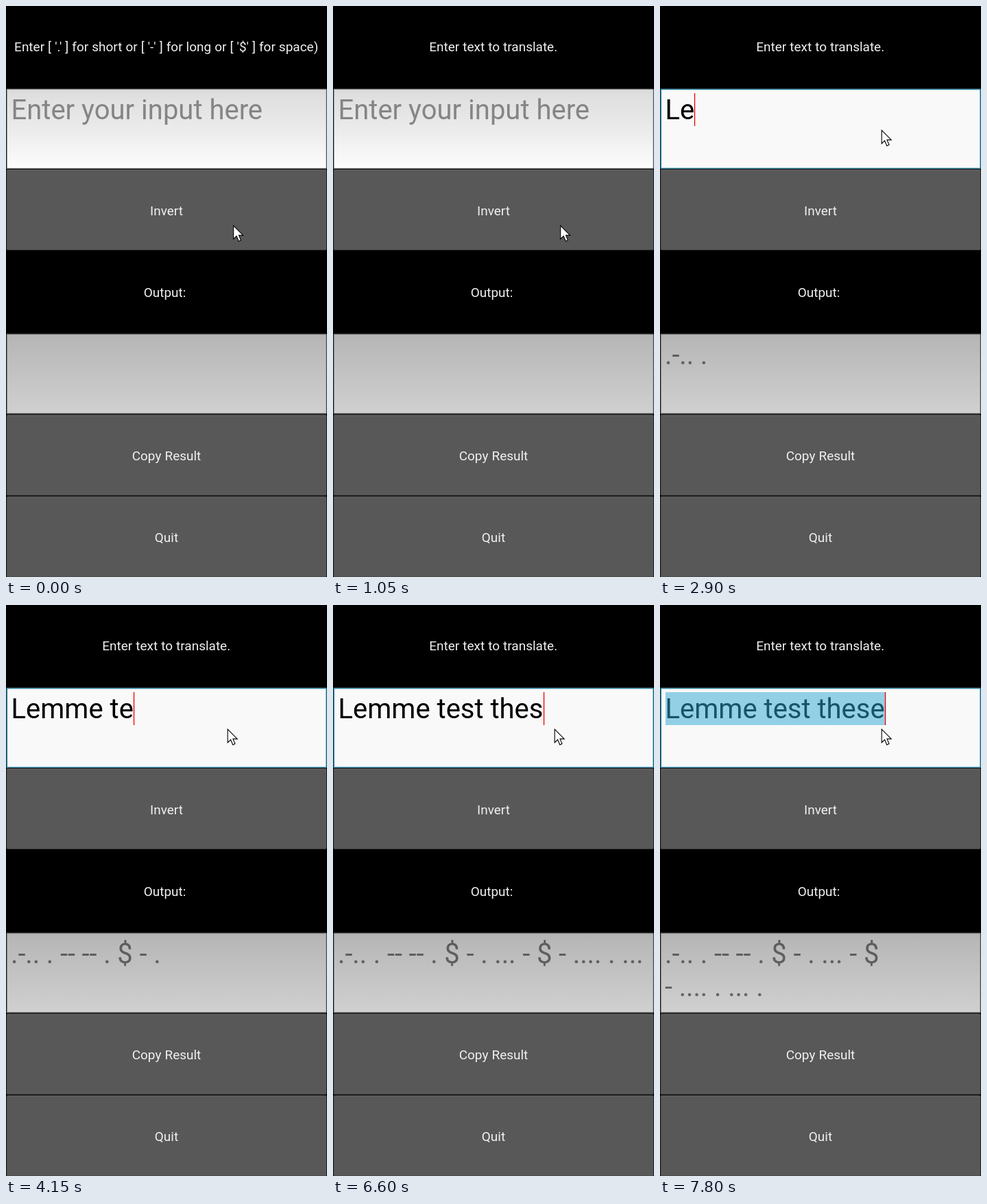
An HTML page that plays this animation: 468 by 832 pixels, repeating every 8000 ms.

```html
<!DOCTYPE html>
<html lang="en">
<head>
<meta charset="utf-8">
<title>Morse translator</title>
<style>
  html, body { margin: 0; width: 100%; height: 100%; overflow: hidden; background: #000; }
  svg { display: block; width: 468px; height: 832px; }
  text { font-family: Roboto, sans-serif; white-space: pre; }
  .label { font-size: 19px; word-spacing: .3px; fill: #f0f0f0; text-anchor: middle; }
  .field { font-size: 40px; }
  .morse { fill: #000; fill-opacity: .5; letter-spacing: -.15px; }
</style>
</head>
<body>
<svg viewBox="0 0 468 832">
  <defs>
    <linearGradient id="light" x2="0" y2="1">
      <stop stop-color="#dadada"/><stop offset=".08" stop-color="#dfdfdf"/>
      <stop offset=".5" stop-color="#ebebeb"/><stop offset="1" stop-color="#fdfdfd"/>
    </linearGradient>
    <linearGradient id="dim" x2="0" y2="1">
      <stop stop-color="#b4b4b4"/><stop offset=".1" stop-color="#b8b8b8"/>
      <stop offset="1" stop-color="#d0d0d0"/>
    </linearGradient>
    <g id="button">
      <rect x=".5" y="-1" width="467" height="118.6" rx="2" fill="#2c2c2c"/>
      <rect x="1.2" y=".2" width="466" height="116.5" rx="1" fill="#585858"/>
      <rect x="2" y=".5" width="464" height="1" fill="#666"/>
    </g>
    <rect id="frame" x=".5" y="-.7" width="467" height="117.4" rx="1.5" fill="#3c3c3c"/>
  </defs>
  <rect width="468" height="832"/>

  <text id="title" class="label" x="233.7" y="66"></text>

  <use href="#frame" y="121"/>
  <rect id="input" x="1.5" y="121.5" width="465.5" height="115"/>
  <text id="typed" class="field" x="7.5" y="165"></text>
  <rect id="select" x="8" y="127" height="48" fill="#2fa7d4" opacity=".5"/>
  <rect id="caret" y="127" width="1.3" height="48" fill="#f00000"/>

  <use href="#button" y="238.5"/>
  <rect id="pressed" x=".8" y="238.2" width="466.6" height="117.4" rx="2" fill="#33a3cf"/>
  <text class="label" x="234" y="305">Invert</text>

  <text class="label" x="231.5" y="424">Output:</text>
  <use href="#frame" y="478"/>
  <rect x="1.5" y="478.5" width="465.5" height="115" fill="url(#dim)" stroke="#7c7c7c"/>
  <text id="row1" class="field morse" x="7" y="522"></text>
  <text id="row2" class="field morse" x="7" y="570"></text>

  <use href="#button" y="596"/>
  <text class="label" x="234" y="662">Copy Result</text>
  <use href="#button" y="715"/>
  <text class="label" x="234" y="781">Quit</text>

  <path id="mouse" d="M0 .5V20L4.4 15.8 7.6 23.2 10.8 21.8 7.8 14.6H14Z"
        fill="#fff" stroke="#000" stroke-width="1.1"/>
</svg>
<script>
const LOOP = 8000, TICK = 50;
const PRESS = 800, RELEASE = 1050, ARRIVE = 1400, FOCUS = 1700, SELECT = 7400, BLINK = 500;
const LEFT = 8, WRAP = 460;
const HINT = 'Enter your input here';
const TITLES = [
  "Enter [ '.' ] for short or [ '-' ] for long or [ '$' ] for space)",
  'Enter text to translate.'
];
const CODE = { l: '.-..', e: '.', m: '--', t: '-', s: '...', h: '....', i: '..', ' ': '$' };

// [time, key]; '<' is backspace
const KEYS = [
  [2650, 'L'], [2850, 'e'], [3250, 'm'], [3400, 'm'], [3500, 'e'], [3600, ' '],
  [4050, 't'], [4150, 'e'], [4550, 's'], [4800, 't'], [5000, ' '],
  [5100, 't'], [5300, 'h'], [5800, 'i'], [6200, '<'], [6350, 'e'], [6600, 's'], [6750, 'e']
];

const $ = id => document.getElementById(id);
const set = (id, attrs) => {
  for (const name in attrs) $(id).setAttribute(name, attrs[name]);
};
const show = (id, on) => set(id, { visibility: on ? 'visible' : 'hidden' });
const write = (id, text) => {
  if ($(id).textContent !== text) $(id).textContent = text;
};
const widthOf = id => $(id).textContent ? $(id).getComputedTextLength() : 0;
const ease = p => p * p * (3 - 2 * p);

function drawMouse(t) {
  const p = ease(Math.min(1, Math.max(0, (t - RELEASE) / (ARRIVE - RELEASE))));
  set('mouse', { transform: `translate(${331.7 - 8.5 * p} ${319.5 - 139 * p})` });
}

function drawMorse(text) {
  const morse = [...text.toLowerCase()].map(c => CODE[c]).join(' ');
  write('row1', morse);
  write('row2', '');
  if (LEFT + widthOf('row1') > WRAP) {
    const cut = morse.lastIndexOf('$') + 1;
    write('row1', morse.slice(0, cut));
    write('row2', morse.slice(cut + 1));
  }
}

function drawInput(t) {
  const focused = t >= FOCUS;
  const past = KEYS.filter(([at]) => at <= t);
  const text = past.reduce((s, [, key]) => key === '<' ? s.slice(0, -1) : s + key, '');
  const last = past.length ? past[past.length - 1][0] : FOCUS;

  set('input', focused
    ? { fill: '#f9f9f9', stroke: '#3390b2', 'stroke-width': 1.4 }
    : { fill: 'url(#light)', stroke: '#929292', 'stroke-width': 1 });
  write('typed', text || HINT);
  set('typed', { fill: text ? '#000' : '#858585' });

  const width = text ? widthOf('typed') : 0;
  set('caret', { x: Math.round(LEFT + width - .3) - .1 });
  show('caret', focused && Math.floor((t - last) / BLINK) % 2 === 0);
  set('select', { width });
  show('select', t >= SELECT);
  drawMorse(text);
}

let drawn = -1;
function draw(now) {
  const t = Math.floor(now % LOOP / TICK) * TICK;
  if (t !== drawn) {
    drawn = t;
    write('title', TITLES[t < RELEASE ? 0 : 1]);
    show('pressed', t >= PRESS && t < RELEASE);
    drawInput(t);
    drawMouse(t);
  }
}

const start = performance.now();
function loop() {
  draw(performance.now() - start);
  requestAnimationFrame(loop);
}
loop();
</script>
</body>
</html>
```
